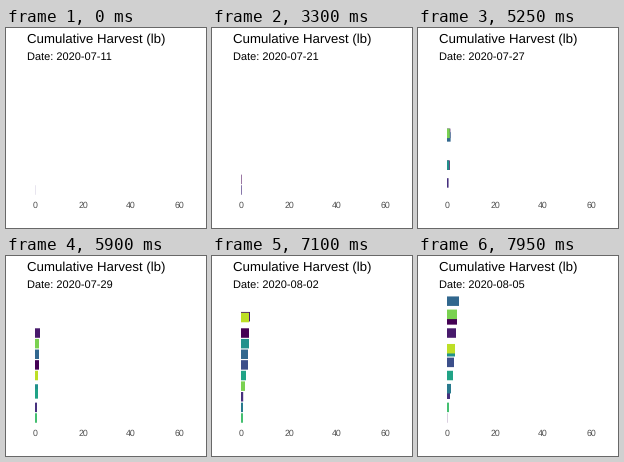
These frames come from a looping animation (200 by 200 pixels, 8000 ms). A matplotlib script:

```python
import matplotlib.pyplot as plt
import numpy as np
from matplotlib.animation import FuncAnimation
from matplotlib.patches import Rectangle

plt.rcParams["font.family"] = "Liberation Sans"
plt.rcParams["text.hinting"] = "none"

SIZE, DPI = 200, 100
FRAMES, STEP = 160, 50
DAY_MS = 315
LEFT, BOTTOM, PITCH, THICK = 29, 162, 10.62, 9.5

# Position of each bar on the viridis scale, drawn from dark to light.
SHADES = dict(B=0.0, X=0.04, E=0.07, G=0.14, N=0.24, D=0.33,
              U=0.41, T=0.5, F=0.58, H=0.7, C=0.8, L=0.9)

# Ranking for each day, from the lowest bar to the highest.
RANKS = (["G"] * 10
         + ["GB", "GBE", "GBED", "G.BED"]
         + ["GBETCD"] * 3
         + ["HGTBLDCE", "HGTFLBDCE", "HGFTLBDCE", "HGFDBCLET",
            "HUGNFCTDBLE", "HUGCFNDTBEL", "HUGCFNDTBLE",
            "HUGFNTLEBCD", "XHGUFNTLEBCD", "XHUGFLNTECBD"])

# Bar lengths in pixels at a few days, linear in between.
KNOTS = [0, 6, 13.65, 18.73, 20.48, 22.54, 25.24]
LENGTHS = dict(
    G=[0.12, 0.3, 0.9, 2, 2, 2.2, 3],
    B=[0, 0, 0.9, 4, 5, 8, 10],
    E=[0, 0, 0.9, 5, 7, 9, 9],
    D=[0, 0, 3, 4, 5, 7, 12],
    T=[0, 0, 1, 3, 6, 8, 8],
    C=[0, 0, 1, 4, 4, 4, 10],
    H=[2] * 7,
    F=[3, 3, 3, 3, 4, 5, 6],
    L=[0, 0, 1, 3, 7, 8, 8],
    N=[7] * 7,
    U=[2, 2, 2, 2, 2, 2, 4],
    X=[0.2] * 7,
)

fig = plt.figure(figsize=(SIZE / DPI, SIZE / DPI), dpi=DPI, facecolor="white")
ax = fig.add_axes([0, 0, 1, 1])
ax.set_xlim(0, SIZE)
ax.set_ylim(SIZE, 0)
ax.axis("off")


def label(x, y, text, px, color="black", ha="left"):
    return ax.text(x, y, text, fontsize=px * 72 / DPI, color=color,
                   ha=ha, va="baseline")


label(20.6, 15, "Cumulative Harvest (lb)", 13.2)
date = label(20.6, 32, "", 11)
for pounds in range(0, 80, 20):
    label(LEFT + 2.4 * pounds, 180, str(pounds), 8.8, "#4d4d4d", "center")

bars = {}
for z, (key, shade) in enumerate(SHADES.items()):
    bars[key] = ax.add_patch(Rectangle(
        (LEFT, 0), 0, THICK, color=plt.cm.viridis(shade), linewidth=0,
        snap=False, zorder=2 + z / 100))


def date_text(day):
    number = 11 + day
    month = 7 if number <= 31 else 8
    return f"Date: 2020-{month:02d}-{(number - 1) % 31 + 1:02d}"


def draw(frame):
    clock = frame * STEP / DAY_MS
    day = int(clock)
    part = clock - day
    date.set_text(date_text(day))
    # No harvest between days 14 and 16.
    length_day = 14 if 14 <= clock < 16 else clock
    now, then = RANKS[day], RANKS[day + 1]
    for key, bar in bars.items():
        bar.set_visible(key in now)
        if key not in now:
            continue
        start = now.index(key)
        end = then.index(key) if key in then else start
        slot = start + (end - start) * part
        bar.set_y(BOTTOM - PITCH * slot - THICK / 2)
        bar.set_width(np.interp(length_day, KNOTS, LENGTHS[key]))
    return [date, *bars.values()]


anim = FuncAnimation(fig, draw, frames=FRAMES, interval=STEP,
                     init_func=lambda: draw(0), repeat=True, repeat_delay=0)
plt.show()
```
